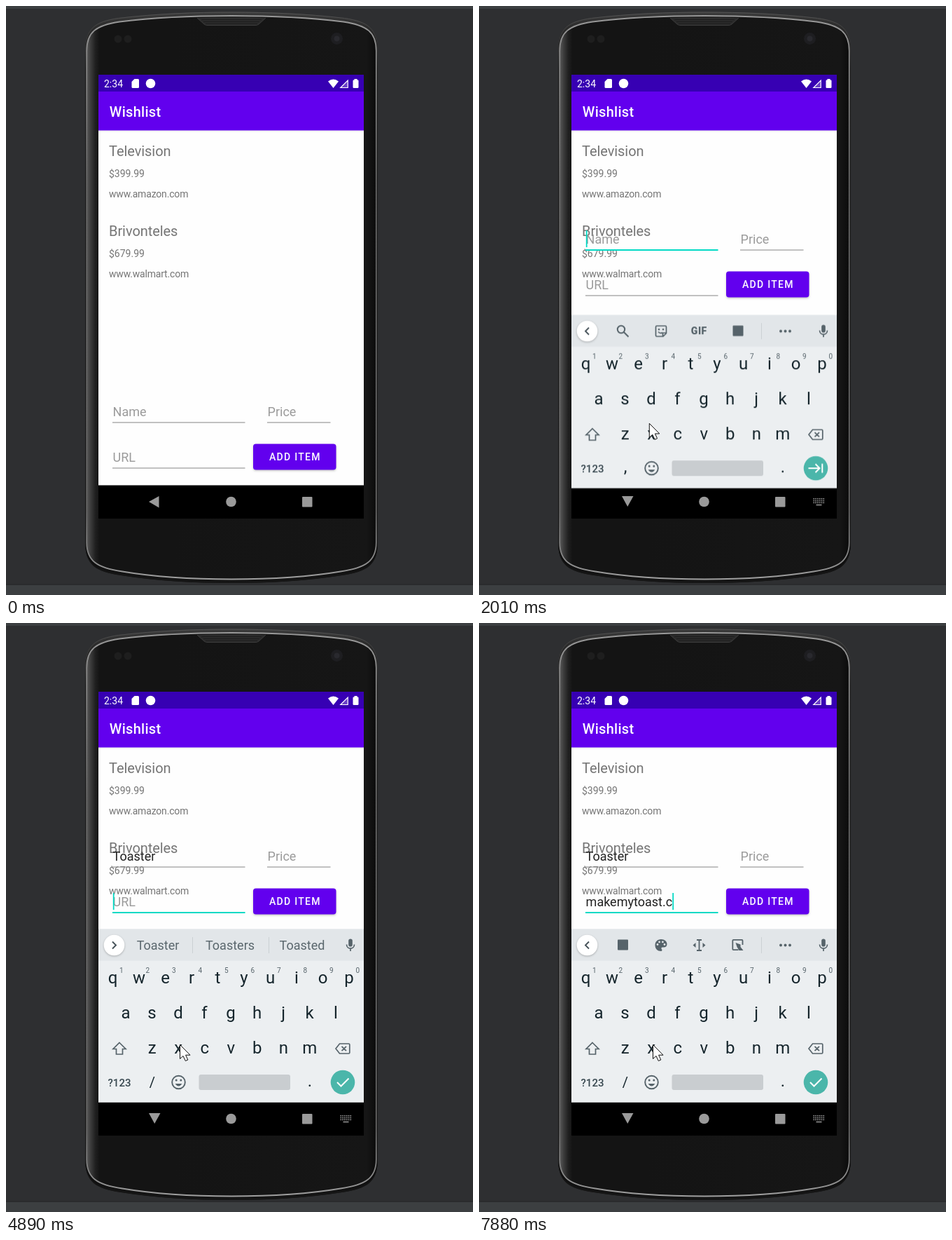
An HTML page with a canvas that plays this animation: 667 by 840 pixels, repeating every 8 s.

```html
<!DOCTYPE html>
<html lang="en">
<head>
<meta charset="utf-8">
<title>Wishlist</title>
<style>
html, body { margin: 0; width: 100%; height: 100%; overflow: hidden; background: #2e2f31; }
canvas { display: block; width: 667px; height: 840px; }
</style>
</head>
<body>
<canvas id="stage" width="667" height="840"></canvas>
<script>
const LOOP = 8000;
const screenCtx = document.getElementById('stage').getContext('2d');
const layer = document.createElement('canvas');
layer.width = 667;
layer.height = 840;
const layerCtx = layer.getContext('2d');
let c = screenCtx;

const PURPLE = '#6200ee', TEAL = '#03dac5', ICON = '#56636a', INK = '#15252c';
const FONT = 'Roboto, "Open Sans", sans-serif';

// Timelines: [start, value]
const nameLine = [[0, ''], [3140, 'To'], [3200, 'Toa'], [3340, 'Toas'], [3470, 'Toast'],
  [3540, 'Toaste'], [3820, 'Toaster']];
const urlLine = [[0, ''], [5900, 'm'], [5970, 'ma'], [6040, 'mak'], [6150, 'make'], [6240, 'makem'],
  [6350, 'makemy'], [6890, 'makemyt'], [6960, 'makemyto'], [7060, 'makemytoa'], [7200, 'makemytoas'],
  [7270, 'makemytoast'], [7670, 'makemytoast.'], [7880, 'makemytoast.c']];
const caretLine = [[0, 0], [1530, 1], [2070, 0], [2540, 1], [3020, 0], [3140, 1], [4360, 0],
  [4820, 1], [5370, 0], [5830, 1]];
const stripLine = [[0, 'empty'], [2000, 'tools'], [3140, 'To Today Too'], [3200, 'Toa Toast Toad'],
  [3400, 'Toast Toasts Toasty'], [3540, 'Toaste Toaster Toasted'], [3820, 'Toaster Toasters Toasted'],
  [4950, 'urlTools'], [5900, 'm my me'], [6040, 'mak make making'], [6150, 'make makes makeover'],
  [6350, 'makemy makes makeover'], [6890, 'makemyt makemy makemytea'],
  [7060, 'makemytoa makemyto makemytoad'], [7270, 'makemytoast makemytoasts makemytoasty'],
  [7740, 'urlTools']];

function at(line, t) {
  let value = line[0][1];
  for (const [start, v] of line) if (t >= start) value = v;
  return value;
}

function mix(points, t) {
  if (t <= points[0][0]) return points[0].slice(1);
  for (let i = 1; i < points.length; i++) {
    const [a, b] = [points[i - 1], points[i]];
    if (t < b[0]) {
      const k = (t - a[0]) / (b[0] - a[0]);
      return a.slice(1).map((v, j) => v + (b[j + 1] - v) * k);
    }
  }
  return points[points.length - 1].slice(1);
}

function rect(x, y, w, h, color, r = 0) {
  c.fillStyle = color;
  c.beginPath();
  c.roundRect(x, y, w, h, r);
  c.fill();
}

function disc(x, y, r, color) {
  c.fillStyle = color;
  c.beginPath();
  c.arc(x, y, r, 0, 7);
  c.fill();
}

function text(s, x, y, size, color, { weight = 400, align = 'left', gap = 0 } = {}) {
  c.font = `${weight} ${size}px ${FONT}`;
  c.textAlign = align;
  c.letterSpacing = gap + 'px';
  c.fillStyle = color;
  c.fillText(s, x, y);
  c.letterSpacing = '0px';
}

function widthOf(s, size) {
  c.font = `400 ${size}px ${FONT}`;
  return c.measureText(s).width;
}

function shape(d, x, y, color, line = 0) {
  c.save();
  c.translate(x, y);
  const path = new Path2D(d);
  if (line) {
    c.strokeStyle = color;
    c.lineWidth = line;
    c.stroke(path);
  } else {
    c.fillStyle = color;
    c.fill(path);
  }
  c.restore();
}

function shaded(color, blur, dy, draw) {
  c.save();
  c.shadowColor = color;
  c.shadowBlur = blur;
  c.shadowOffsetY = dy;
  draw();
  c.restore();
}

function gradient(x0, y0, x1, y1, stops) {
  const g = c.createLinearGradient(x0, y0, x1, y1);
  stops.forEach(([p, color]) => g.addColorStop(p, color));
  return g;
}

// Phone outline, inset by ix at the sides and iy at top and bottom
function body(ix, iy) {
  const l = 113 + ix, r = 531 - ix, top = 8.5 + iy, bot = 823 - iy;
  return `M${l},64 C${l},${32 + iy} ${126 + ix},${22 + iy} ${160 + ix},${17 + iy}
    C215,${10.5 + iy} 270,${top} 322,${top} C374,${top} 429,${10.5 + iy} ${484 - ix},${17 + iy}
    C${518 - ix},${22 + iy} ${r},${32 + iy} ${r},64 L${r},765
    C${r},${797 - iy} ${516 - ix},${807 - iy} ${480 - ix},${812 - iy}
    C430,${820 - iy} 375,${bot} 322,${bot} C269,${bot} 214,${820 - iy} ${164 + ix},${812 - iy}
    C${128 + ix},${807 - iy} ${l},${797 - iy} ${l},765 Z`;
}

function phone() {
  rect(0, 0, 667, 840, '#2e2f31');
  rect(0, 0, 667, 4, '#3c3f41');
  rect(0, 826, 667, 14, '#3c3f41');
  rect(0, 824.5, 667, 1, '#27282a');
  shape(body(0, 0), 0, 0, gradient(0, 8, 0, 823,
    [[0, '#3c3c3c'], [.02, '#303030'], [.08, '#161616'], [.95, '#0d0d0d'], [1, '#161616']]));
  shape(body(.5, .5), 0, 0, gradient(0, 8, 0, 823, [[0, '#555'], [.1, '#1c1c1c'], [1, '#161616']]), 1);
  shape(body(2.2, 5), 0, 0, gradient(116, 0, 528, 0,
    [[0, '#565656'], [.012, '#3c3c3c'], [.028, '#202020'], [.042, '#141414'], [.3, '#141414'], [.97, '#161616'], [1, '#0c0c0c']]));
  shape(body(2.2, 5.5), 0, 0, gradient(0, 12, 0, 818,
    [[0, '#9a9a9a'], [.07, '#8a8a8a'], [.3, '#666'], [.88, '#666'], [.97, '#8c8c8c'], [1, '#a0a0a0']]), 1.8);
  shape('M273,17 Q322,14 371,17 L361,26 Q359,27.5 356,27.5 L288,27.5 Q285,27.5 283,26 Z', 0, 0, '#2b2b2b');
  shape('M273,17 L283,26 Q285,27.5 288,27.5 L356,27.5 Q359,27.5 361,26 L371,17', 0, 0, '#3c3c3c', 1);
  for (let y = 19; y < 27; y += 3) rect(277 + (y - 17), y, 90 - 2 * (y - 17), 1, '#1c1c1c');
  disc(160, 47, 5.5, '#1e1e1e');
  disc(174, 47, 5.5, '#1e1e1e');
  disc(472.5, 46.5, 8.5, '#1e1e21');
  disc(472.5, 46.5, 4, '#29292e');
}

function field(x, y, w, value, hint, focused, caret, composing) {
  text(value || hint, x + .6, y, 18, value ? '#212121' : '#9b9b9b');
  const end = widthOf(value, 18);
  if (composing && value) rect(x + .6, y + 1.5, end, 1, '#333');
  if (focused) rect(x, y + 8, w, 2, TEAL);
  else rect(x, y + 8.5, w, 1, '#858585');
  if (focused && caret) rect(x + .8 + end, y - 19, 1.8, 24, TEAL);
}

function item(y, title, price, url) {
  text(title, 147, y, 20, '#757575', { gap: -.06 });
  text(price, 147, y + 30, 14, '#757575');
  text(url, 147, y + 59, 14, '#757575', { gap: -.18 });
}

function app(t) {
  rect(132, 98, 379, 633, '#fefefe');
  rect(132, 177.5, 379, 3, gradient(0, 177.5, 0, 180.5, [[0, '#ececec'], [1, '#fefefe']]));
  rect(132, 122, 379, 55.5, PURPLE);
  rect(132, 98, 379, 24, '#3700b3');
  text('2:34', 140, 116, 14, '#fff');
  shape('M4,0 L9,0 Q10.5,0 10.5,1.5 L10.5,11.5 Q10.5,13 9,13 L1.5,13 Q0,13 0,11.5 L0,4 Z', 179.5, 104, '#fff');
  disc(206.5, 110.5, 6.8, '#fff');
  shape('M0,3.5 Q7.5,-2.5 15,3.5 L7.5,13 Z', 460, 104, '#fff');
  const signal = 'M.8,12 L11.2,12 L11.2,1.6 Z';
  shape(signal, 477, 104.5, 'rgba(255,255,255,.25)');
  shape(signal, 477, 104.5, '#fff', 1.2);
  rect(495.5, 105.5, 8, 11.5, '#fff', 1.2);
  rect(497.5, 104, 4, 2, '#fff');
  text('Wishlist', 147.8, 158, 20, '#fff', { weight: 500, gap: .28 });
  item(214, 'Television', '$399.99', 'www.amazon.com');
  item(328, 'Brivonteles', '$679.99', 'www.walmart.com');

  const lift = t >= 1800 ? 246 : 0;
  const onUrl = t >= 4820, onName = t >= 1530 && !onUrl;
  const caret = at(caretLine, t);
  field(152, 585 - lift, 189.5, at(nameLine, t), 'Name', onName, caret, !onUrl);
  field(373, 585 - lift, 90.5, '', 'Price', false);
  field(152, 650 - lift, 189.5, at(urlLine, t), 'URL', onUrl, caret, t < 7670);
  shaded('rgba(0,0,0,.22)', 3, 1.5, () => rect(353, 624.5 - lift, 118.5, 37, PURPLE, 4));
  text('ADD ITEM', 376, 648.3 - lift, 14, '#fff', { weight: 500, gap: 1.28 });
}

function nav(open) {
  const gray = '#9a9a9a';
  rect(132, 683.5, 379, 47.5, '#000');
  shape(open ? 'M204,699 L220.5,699 L212.2,714 Z' : 'M204,707 L218.5,699 L218.5,715.5 Z', 0, 0, gray);
  disc(321.5, 707, 7.3, gray);
  rect(423, 700, 14.5, 14.5, gray, 1);
  if (!open) return;
  for (let row = 0; row < 3; row++)
    for (let i = 0; i < 6; i++) rect(477.5 + i * 2.8, 702 + row * 2.8, 1.6, 1.6, gray);
  rect(481.5, 710.8, 8, 1.5, gray);
}

function moreDots() {
  rect(403, 448, 1, 23, '#cbd0d3');
  [431, 437.5, 444].forEach(x => disc(x, 459.5, 2, ICON));
}

const translateIcon = x => rect(x - 7.5, 451.5, 15, 15, ICON, 1);

function tools() {
  c.strokeStyle = ICON;
  c.lineWidth = 2;
  c.beginPath();
  c.arc(203, 457, 5.2, 0, 7);
  c.moveTo(207, 461);
  c.lineTo(213.5, 467.5);
  c.stroke();
  shape('M-6,-7.5 L6,-7.5 Q7.5,-7.5 7.5,-6 L7.5,3 L3,7.5 L-6,7.5 Q-7.5,7.5 -7.5,6 L-7.5,-6 Q-7.5,-7.5 -6,-7.5 Z M7,2.5 L2.5,2.5 L2.5,7 M-4,1 Q-1,4 2,2',
    260, 459.5, ICON, 1.7);
  disc(257, 457, 1.3, ICON);
  disc(263, 457, 1.3, ICON);
  text('GIF', 314.3, 464, 14, ICON, { weight: 900, align: 'center', gap: .5 });
  translateIcon(370);
  moreDots();
}

function urlTools() {
  translateIcon(205.5);
  shape('M0,-8.5 C5,-8.5 8.5,-5.5 8.5,-1.5 C8.5,1.5 6.5,3 4,3 L2,3 C.3,3 0,4.5 .8,5.5 C2,7 1.5,8.5 0,8.5 C-5,8.5 -8.5,5 -8.5,0 C-8.5,-5 -5,-8.5 0,-8.5 Z',
    260, 459.5, ICON);
  [[-5, -1], [-2.4, -4.6], [2.4, -4.6], [5, -1]].forEach(([x, y]) => disc(260 + x, 459.5 + y, 1.4, '#e2e6e9'));
  shape('M-3.5,-7.5 L3.5,-7.5 M0,-7.5 L0,7.5 M-3.5,7.5 L3.5,7.5', 314.5, 459.5, ICON, 1.8);
  shape('M-5,-3.5 L-9,0 L-5,3.5 Z M5,-3.5 L9,0 L5,3.5 Z', 314.5, 459.5, ICON);
  shape('M7,0 L7,-6 Q7,-7.2 6,-7.2 L-6,-7.2 Q-7.2,-7.2 -7.2,-6 L-7.2,6 Q-7.2,7.2 -6,7.2 L1,7.2', 369.5, 459, ICON, 1.8);
  shape('M-3,-3 L4,-.5 L4,3 L8,8 L2,8 L-1,3 Z', 369.5, 459, ICON);
  moreDots();
}

function suggestions(words) {
  words.split(' ').forEach((word, i) => {
    const size = 18 * Math.min(1, 86 / widthOf(word, 18));
    text(word, 217 + 103 * i, 466, size, '#5a676d', { align: 'center' });
  });
  rect(266, 448, 1, 23, '#cbd0d3');
  rect(375, 448, 1, 23, '#cbd0d3');
}

function strip(mode) {
  rect(132, 436.5, 379, 45, '#e2e6e9');
  const hasTools = mode === 'tools' || mode === 'urlTools';
  shaded('rgba(0,0,0,.25)', 3, 1, () => disc(154.5, 459.5, 14.8, '#fff'));
  shape(hasTools ? 'M2.5,-5 L-2.5,0 L2.5,5' : 'M-2.5,-5 L2.5,0 L-2.5,5', 154.5, 459.5, '#455158', 1.9);
  rect(489.2, 450.5, 5.6, 11, ICON, 2.8);
  shape('M-5.5,-1 C-5.5,6.5 5.5,6.5 5.5,-1 M0,4.5 L0,8.5', 492, 459.5, ICON, 1.7);
  if (mode === 'tools') tools();
  else if (mode === 'urlTools') urlTools();
  else if (mode !== 'empty') suggestions(mode);
}

function keyRow(keys, x, y) {
  [...keys].forEach((k, i) => text(k, x + 37.5 * i, y, 24, INK, { align: 'center' }));
}

function keyboard(t) {
  const url = t >= 4890;
  rect(132, 436.5, 379, 247, '#eceff1');
  strip(at(stripLine, t));
  keyRow('qwertyuiop', 152.5, 514);
  [...'1234567890'].forEach((k, i) => text(k, 164.8 + 37.5 * i, 498.5, 10, ICON, { align: 'center' }));
  keyRow('asdfghjkl', 171, 564);
  keyRow('zxcvbnm', 208.8, 614);
  shape('M0,-8.5 L9,.5 L4.5,.5 L4.5,8 L-4.5,8 L-4.5,.5 L-9,.5 Z', 162, 607, ICON, 1.7);
  shape('M-4.5,-7 L8.5,-7 Q9.8,-7 9.8,-5.7 L9.8,5.7 Q9.8,7 8.5,7 L-4.5,7 L-10,0 Z M-1.5,-3.2 L5,3.2 M5,-3.2 L-1.5,3.2',
    481, 607, ICON, 1.7);
  text('?123', 162, 660.5, 15, '#37474f', { weight: 500, align: 'center' });
  text(url ? '/' : ',', 209, url ? 662 : 661, url ? 20 : 24, INK, { align: 'center' });
  text('.', 434, 661, 24, INK, { align: 'center' });
  shape('M9.3,0 A9.3,9.3 0 1 1 -9.3,0 A9.3,9.3 0 1 1 9.3,0 Z', 246.5, 655, ICON, 1.9);
  shape('M-5,2 Q0,9 5,2 Z', 246.5, 655, ICON);
  disc(243.2, 652, 1.5, ICON);
  disc(249.8, 652, 1.5, ICON);
  rect(275.5, 644, 130.5, 22, '#c9cdd0', 3);
  disc(481, 655, 17.3, '#4bb6aa');
  shape(url ? 'M-8,0 L-2.5,5.5 L8.5,-5.5' : 'M-10.5,0 L5,0 M-.5,-6 L5.5,0 L-.5,6 M9.3,-6.5 L9.3,6.5',
    481, 655, '#fff', 2);
}

function slideKeyboard(t) {
  if (t < 1870) return;
  const [dy, alpha] = mix([[1870, 39, .62], [1900, 36, .68], [1940, 17, .95], [2000, 5, 1], [2070, 0, 1]], t);
  c = layerCtx;
  c.clearRect(0, 0, 667, 840);
  keyboard(t);
  c = screenCtx;
  c.save();
  c.globalAlpha = alpha;
  c.drawImage(layer, 0, dy);
  c.restore();
}

function pointer(t) {
  if (t < 310) return;
  let x, y;
  if (t < 1060) {
    const k = (t - 310) / 750, e = 1 - (1 - k) ** 2;
    x = 547 - 318 * e;
    y = 828 - 241 * e;
  } else {
    [x, y] = mix([[1060, 229, 587], [1200, 229, 582], [1410, 229, 580], [1800, 230, 580],
      [1870, 232, 582], [1900, 233, 583], [2070, 248, 601]], t);
  }
  const arrow = 'M.5,.5 L.5,20.5 L5,16.5 L8.3,23.5 L11.8,22 L8.6,15.2 L15,15.2 Z';
  shape(arrow, x, y, '#fff');
  shape(arrow, x, y, '#111', 1);
}

function draw(t) {
  c = screenCtx;
  phone();
  app(t);
  nav(t >= 1800);
  slideKeyboard(t);
  pointer(t);
}

const begin = performance.now();
function tick() {
  draw((performance.now() - begin) % LOOP);
  requestAnimationFrame(tick);
}
tick();
</script>
</body>
</html>
```
